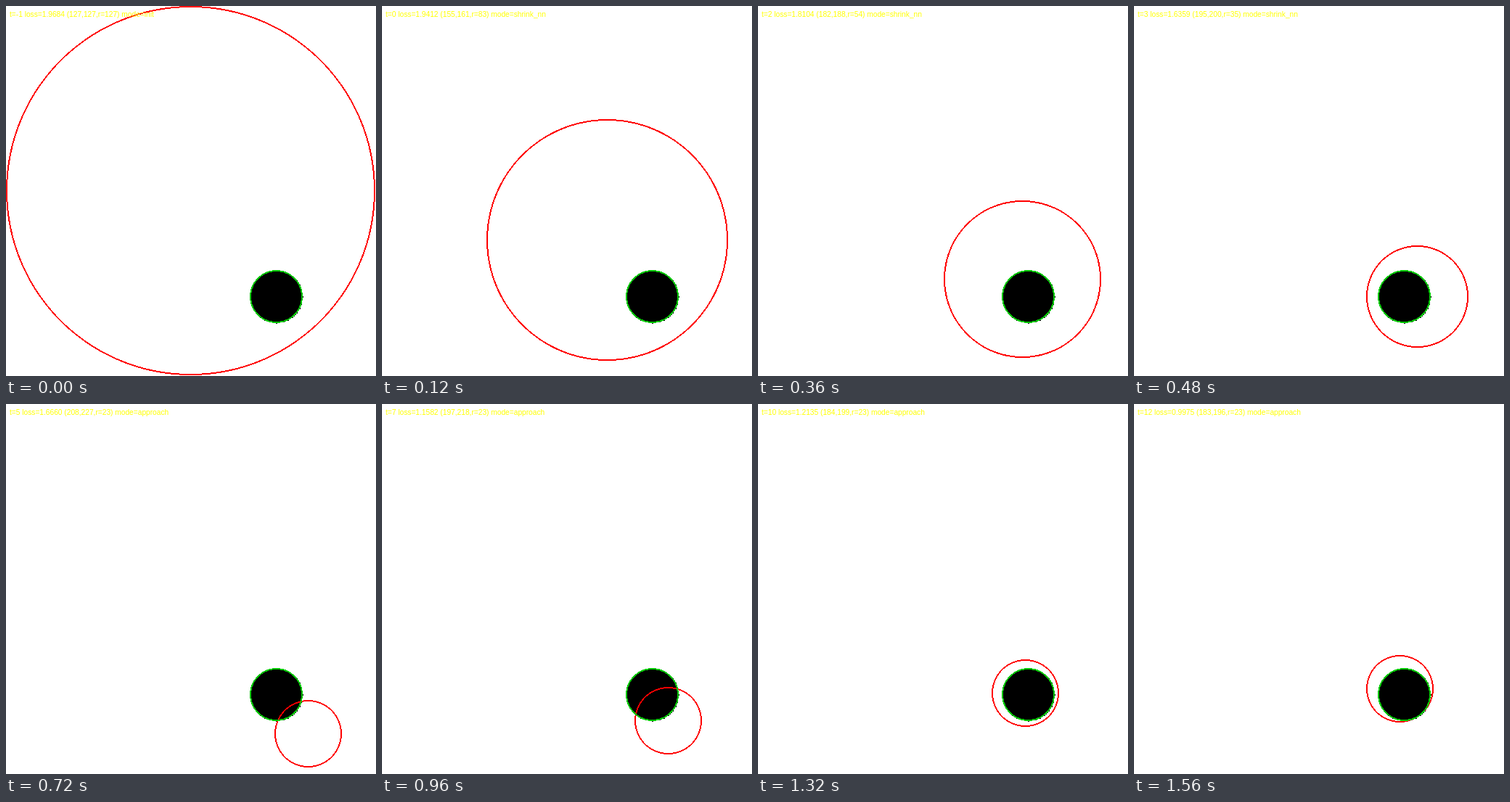
Animation of 510x510 px, one loop 1680 ms. Source, as an HTML page with a canvas:

```html
<!DOCTYPE html>
<html lang="en">
<head>
<meta charset="utf-8">
<style>
  html, body { margin: 0; width: 100%; height: 100%; overflow: hidden; background: #fff; }
  canvas { display: block; }
</style>
</head>
<body>
<canvas id="stage" width="510" height="510"></canvas>
<script>
const ctx = document.getElementById('stage').getContext('2d');
const STEP_MS = 120;
const SCALE = 2;
const TARGET = { x: 186, y: 200, r: 18 };

// One search step per entry: circle centre, loss and mode.
const steps = [
  [127, 127, 1.9684, 'init'],
  [155, 161, 1.9412, 'shrink_nn'],
  [161, 169, 1.9271, 'approach'],
  [182, 188, 1.8104, 'shrink_nn'],
  [195, 200, 1.6359, 'shrink_nn'],
  [203, 215, 1.6523, 'shrink_nn'],
  [208, 227, 1.6660, 'approach'],
  [203, 223, 1.4127, 'approach'],
  [197, 218, 1.1582, 'approach'],
  [191, 210, 1.2436, 'approach'],
  [185, 201, 1.3214, 'approach'],
  [184, 199, 1.2135, 'approach'],
  [184, 198, 1.1048, 'approach'],
  [183, 196, 0.9975, 'approach']
];

// Every shrink step scales the radius by the same factor.
let radius = 127;
const states = steps.map(([x, y, loss, mode], i) => {
  if (mode === 'shrink_nn') radius = Math.round(radius * 0.65);
  return { x, y, r: radius, loss, mode, t: i - 1 };
});

// Quarter circle as a pixel path; gives the nearest and farthest x of each row.
function quarterRows(r) {
  const error = ([x, y]) => Math.abs(x * x + y * y - r * r);
  const rows = [];
  let x = r, y = 0;
  while (true) {
    rows[y] ??= { near: x, far: x };
    rows[y].near = x;
    if (x === 0) return rows;
    [x, y] = [[x, y + 1], [x - 1, y + 1], [x - 1, y]]
      .reduce((best, next) => error(next) < error(best) ? next : best);
  }
}

// Hard-edged ring, two pixels wide, drawn row by row.
function ring({ x, y, r }, color) {
  const cx = x * SCALE, cy = y * SCALE;
  const outer = quarterRows(r * SCALE), inner = quarterRows(r * SCALE - 1);
  ctx.fillStyle = color;
  outer.forEach(({ far }, d) => {
    const near = inner[d] ? inner[d].near : 0;
    const width = far - near + 1;
    for (const row of [cy - d, cy + d]) {
      ctx.fillRect(cx - far, row, width, 1);
      ctx.fillRect(cx + near, row, width, 1);
    }
  });
}

// Disc made of enlarged square cells.
function disc({ x, y, r }) {
  ctx.fillStyle = '#000';
  for (let d = -r; d <= r; d++) {
    const half = Math.floor(Math.sqrt(r * r - d * d));
    ctx.fillRect((x - half) * SCALE, (y + d) * SCALE, (2 * half + 1) * SCALE, SCALE);
  }
}

function draw(s) {
  ctx.fillStyle = '#fff';
  ctx.fillRect(0, 0, 510, 510);
  disc(TARGET);
  ring(s, '#f00');
  ring(TARGET, '#00c800');
  ctx.fillStyle = '#ff0';
  ctx.font = '10.2px "Liberation Sans", Arial, sans-serif';
  ctx.fillText(`t=${s.t} loss=${s.loss.toFixed(4)} (${s.x},${s.y},r=${s.r}) mode=${s.mode}`, 5, 15);
}

function frame() {
  draw(states[Math.floor(performance.now() / STEP_MS) % states.length]);
  requestAnimationFrame(frame);
}
frame();
</script>
</body>
</html>
```
